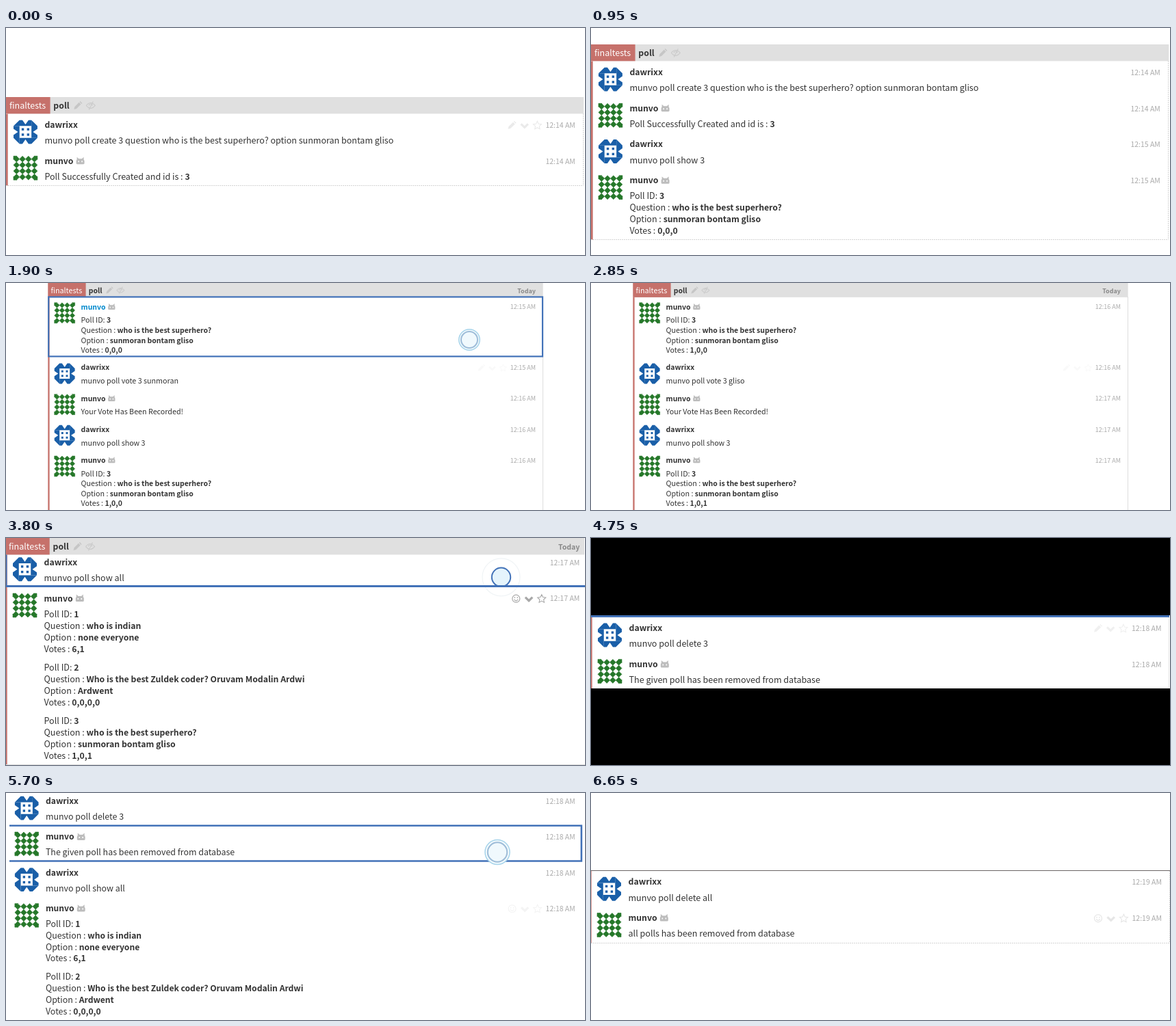
An HTML page for the animation above (7.6 s loop, 846x332 px).

```html
<!DOCTYPE html>
<html lang="en">
<head>
<meta charset="utf-8">
<title>Chat poll</title>
<style>
  html, body { margin: 0; width: 100%; height: 100%; overflow: hidden; background: #fff; }
  svg { display: block; }
  text { font-family: "Noto Sans CJK JP", "Noto Sans CJK SC", "Noto Sans CJK", sans-serif; }
</style>
</head>
<body>
<svg id="stage" width="846" height="332" viewBox="0 0 846 332"></svg>
<script>
const SLOT = 950, USER = 'dawrixx', BOT = 'munvo';
const BLUE = '#4272b8', RED = '#c6716b', INK = '#333';
const ROW = 52.8, LINE = 17, GAP = 10, HEAD = 24.4;
const REGULAR = 12.55, BOLD = 12.25, SMALL = 10.5;

const rect = (x, y, w, h, fill) => `<rect x="${x}" y="${y}" width="${w}" height="${h}" fill="${fill}"/>`;
const path = (d, attrs) => `<path d="${d}" ${attrs}/>`;
const group = (x, y, s, body) => `<g transform="translate(${x} ${y}) scale(${s})">${body}</g>`;
const text = (x, y, str, { bold, size = bold ? BOLD : REGULAR, fill = INK, end } = {}) =>
  `<text x="${x}" y="${y}" font-size="${size}" fill="${fill}" font-weight="${bold ? 700 : 400}"` +
  ` text-anchor="${end ? 'end' : 'start'}">` +
  str.replace(/\*(.+?)\*/g, `<tspan font-weight="700" font-size="${BOLD}">$1</tspan>`) + '</text>';

// Icons are centred on 0,0
const icons = {
  pencil: c => path('M-5.5 5.5l1-3.8 6.4-6.4 2.8 2.8-6.4 6.4zM2.8-5.5l1-.9 2.8 2.8-1 1z', `fill="${c}"`),
  eye: c => path('M-6.5 0Q0-8 6.5 0Q0 8-6.5 0M-2.5 0a2.5 2.5 0 0 1 5 0M3.5-6l-6 12', `fill="none" stroke="${c}" stroke-width="1.2"`),
  smile: c => `<circle r="5.5" fill="none" stroke="${c}" stroke-width="1.2"/>` +
    path('M-2.8 1.2Q0 5 2.8 1.2M-2-2.4v1.8M2-2.4v1.8', `fill="none" stroke="${c}" stroke-width="1.3"`),
  chevron: c => path('M-5.2-2L0 3 5.2-2', `fill="none" stroke="${c}" stroke-width="3.2"`),
  star: c => path('M0-6l1.8 3.9 4.2.5-3.1 2.9.8 4.2L0 3.4l-3.7 2.1.8-4.2-3.1-2.9 4.2-.5z', `fill="none" stroke="${c}" stroke-width="1.1"`),
  bot: c => path('M-5-5.5L-2.2-3H2.2L5-5.5V-2L6 0V3.5Q6 5 4.5 5h-9Q-6 5-6 3.5V0l1-2z', `fill="${c}"`) +
    path('M-2.5 0v2M2.5 0v2', 'stroke="#fff" stroke-width="1.6"')
};
const icon = (name, x, y, color) => group(x, y, 1, icons[name](color));

// One quarter of the blue avatar, turned around the centre
const quarter = path('M-8.75-17.5H-4.5L0-11 4.5-17.5H8.75V-8.75H-17.5z', 'fill="#1a5fa8"') +
  rect(-5.6, -5.6, 3.4, 3.4, '#1a5fa8');
const blueAvatar = group(17.5, 17.5, 1, [0, 90, 180, 270].map(a => `<g transform="rotate(${a})">${quarter}</g>`).join(''));

// Four by four touching diamonds, with filled corners
function diamondAvatar() {
  const h = 35 / 8;
  let d = 'M0 0h5L0 5zM35 0v5l-5-5zM35 35h-5l5-5zM0 35v-5l5 5z';
  for (let r = 0; r < 4; r++)
    for (let k = 0; k < 4; k++)
      d += `M${(2 * k + 1) * h} ${2 * r * h}l${h} ${h}l${-h} ${h}l${-h} ${-h}z`;
  return path(d, 'fill="#26782a" stroke="#26782a" stroke-width=".6"');
}
const greenAvatar = diamondAvatar();

const advance = line => line ? LINE : GAP;
const rowHeight = ({ lines }) => ROW + lines.slice(1).reduce((sum, l) => sum + advance(l), 0);

function drawRow(row, top, right) {
  const { who, time, lines, tools, tint, hover } = row;
  const isBot = who === BOT;
  let y = top + 44;
  let out = group(11, top + 9.3, 1, isBot ? greenAvatar : blueAvatar) +
    text(56.5, top + 20.8, who, { bold: true, fill: hover ? '#0088cc' : INK }) +
    text(right, top + 20.6, time + ' AM', { size: SMALL, fill: '#aaa', end: true });
  if (isBot) out += icon('bot', 108.8, top + 16.3, '#bdbdbd');
  if (tools) [tools, 'chevron', 'star'].forEach((name, i) => out += icon(name, right - 93 + i * 18.7, top + 17, tint));
  lines.forEach((line, i) => {
    if (i) y += advance(line);
    if (line) out += text(56.5, y, line);
  });
  return out;
}

function drawHeader(today, right) {
  return rect(0, 0, 846, HEAD, '#e0e0e0') + rect(0, 0, 64.7, HEAD, RED) +
    text(5, 17, 'finaltests', { fill: '#fff' }) + text(69.5, 17, 'poll', { bold: true }) +
    icon('pencil', 105, 12.5, '#c6c6c6') + icon('eye', 124, 12.5, '#cbcbcb') +
    (today ? text(right, 17, 'Today', { size: SMALL, bold: true, fill: '#888', end: true }) : '');
}

function drawScene({ x = 0, y = 0, s = 1, body = HEAD, right, header, today, edge = true, rows, under = '', over = '' }) {
  let top = body, out = '';
  for (const row of rows) {
    out += drawRow(row, top, right);
    top += rowHeight(row);
  }
  if (edge) out = rect(0, body, 2.7, top - body, RED) + out;
  if (header) out += drawHeader(today, right);
  return under + group(x, y, s, out) + over;
}

const say = (time, line, extra) => ({ who: USER, time, lines: [line], ...extra });
const reply = (time, lines, extra) => ({ who: BOT, time, lines: [].concat(lines), ...extra });
const poll = (id, question, option, votes) =>
  [`Poll ID: *${id}*`, `Question : *${question}*`, `Option : *${option}*`, `Votes : *${votes}*`];
const HEROES = 'sunmoran bontam gliso', WHO = 'who is the best superhero?';
const heroes = votes => poll(3, WHO, HEROES, votes);
const firstPolls = [...poll(1, 'who is indian', 'none everyone', '6,1'), '',
  ...poll(2, 'Who is the best Zuldek coder? Oruvam Modalin Ardwi', 'Ardwent', '0,0,0,0')];

const frame = (x, y, w, h, color, width) =>
  `<rect x="${x}" y="${y}" width="${w}" height="${h}" fill="none" stroke="${color}" stroke-width="${width}"/>`;
const ring = (x, y, r, stroke, width, fill = 'none') =>
  `<circle cx="${x}" cy="${y}" r="${r}" stroke="${stroke}" stroke-width="${width}" fill="${fill}"/>`;
const press = (x, y, r) => ring(x, y, r * 1.27, '#a5d3ea', 1.5, '#f2fafd') + ring(x, y, r, '#9dbcd8', 2, '#f0f9fd');
const dotted = (x1, y1, x2, y2) => path(`M${x1} ${y1}L${x2} ${y2}`, 'stroke="#d4d4d4" stroke-dasharray="2 1"');

const created = [
  say('12:14', `${BOT} poll create 3 question ${WHO} option ${HEROES}`, { tools: 'pencil', tint: '#eaeaea' }),
  reply('12:14', 'Poll Successfully Created and id is : *3*')
];
const narrow = { x: 61.3, s: .855, right: 833.5, header: true, today: true };
const narrowSides = rect(784, 20, 1, 312, '#ddd') + rect(785, 0, 61, 332, '#fff');
const removed = 'The given poll has been removed from database';

const voting = (start, pick, before, after, end, over) => drawScene({
  ...narrow,
  rows: [
    reply(start, heroes(before), { hover: !!over }),
    say(start, `${BOT} poll vote 3 ${pick}`, { tools: 'pencil', tint: '#f9f9f9' }),
    reply(end, 'Your Vote Has Been Recorded!'),
    say(end, `${BOT} poll show 3`),
    reply(end, heroes(after))
  ],
  over: narrowSides + over
});

const scenes = [
  drawScene({
    y: 101, s: .998, right: 833.5, header: true, rows: created,
    over: dotted(843.5, 125, 843.5, 230) + dotted(0, 230.5, 844, 230.5) + rect(844, 101, 2, 25, '#fff')
  }),
  drawScene({
    y: 24, s: .998, right: 833.5, header: true,
    rows: [...created.map(r => ({ ...r, tools: '' })), say('12:15', `${BOT} poll show 3`), reply('12:15', heroes('0,0,0'))],
    over: dotted(843.5, 48, 843.5, 310) + dotted(0, 309.5, 844, 309.5)
  }),
  voting('12:15', 'sunmoran', '0,0,0', '1,0,0', '12:16', frame(62.2, 20.4, 721.8, 87, BLUE, 2.2) + press(677, 83, 12)),
  voting('12:16', 'gliso', '1,0,0', '1,0,1', '12:17', ''),
  drawScene({
    x: -1, body: 18.9, right: 839.3, header: true, today: true,
    rows: [
      say('12:17', `${BOT} poll show all`),
      reply('12:17', [...firstPolls, '', ...heroes('1,0,1')], { tools: 'smile', tint: '#a8a8a8' })
    ],
    over: ring(723.5, 57.3, 27.5, '#f0f4f6', 1.2) + ring(723.5, 57.3, 13.7, BLUE, 2, '#e5f4fc') +
      rect(0, 24.4, 1.5, 46, BLUE) + rect(0, 69, 846, 3, BLUE) + rect(0, 331, 846, 1, '#ddd')
  }),
  drawScene({
    x: -1, body: 115.3, right: 834.5,
    rows: [say('12:18', `${BOT} poll delete 3`, { tools: 'pencil', tint: '#f0f0f0' }), reply('12:18', removed)],
    under: rect(0, 0, 846, 332, '#000') + rect(0, 113, 846, 107, '#fff'),
    over: rect(0, 113, 845, 3, BLUE) + rect(844, 116, 1, 104, '#e4e4e4') + rect(0, 220, 846, 112, '#000')
  }),
  drawScene({
    x: 2, s: .99, body: -4.4, right: 838, edge: false,
    rows: [
      say('12:18', `${BOT} poll delete 3`), reply('12:18', removed), say('12:18', `${BOT} poll show all`),
      reply('12:18', firstPolls, { tools: 'smile', tint: '#f4f4f4' })
    ],
    over: path('M5 47.7H840.8V99.5H5', `fill="none" stroke="${BLUE}" stroke-width="2.6"`) + press(718, 86.5, 14.2)
  }),
  drawScene({
    x: -2, body: 113.5, right: 836,
    rows: [
      say('12:19', `${BOT} poll delete all`),
      reply('12:19', 'all polls has been removed from database', { tools: 'smile', tint: '#e6e6e6' })
    ],
    over: rect(0, 113, 846, 1, '#6b6464') + dotted(0, 219.5, 846, 219.5) + dotted(845.5, 114, 845.5, 219)
  })
];

const stage = document.getElementById('stage');
stage.innerHTML = scenes.map(s => `<g display="none">${s}</g>`).join('');
let shown = -1;
function tick() {
  const now = Math.floor(performance.now() / SLOT) % scenes.length;
  if (now !== shown) {
    [...stage.children].forEach((g, i) => g.setAttribute('display', i === now ? 'inline' : 'none'));
    shown = now;
  }
  requestAnimationFrame(tick);
}
tick();
</script>
</body>
</html>
```
